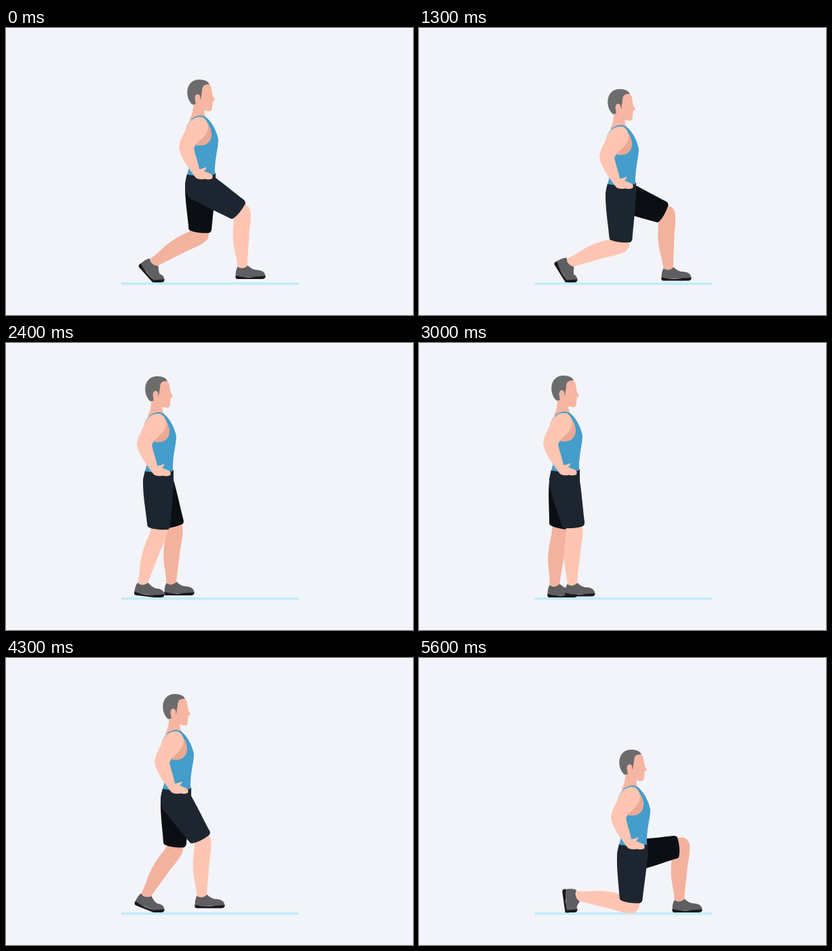
These frames come from a looping animation (600x423 px, 5.7 s). An HTML page:

```html
<!DOCTYPE html>
<html lang="en">
<head>
<meta charset="utf-8">
<title>Lunges</title>
<style>
  html, body { margin: 0; width: 100%; height: 100%; overflow: hidden; background: #f2f4f9; }
  svg { display: block; width: 100%; height: 100%; }
  .near { --skin: #ffc5b2; --shorts: #1d2630; }
  .far { --skin: #f2b29e; --shorts: #0b0f14; }
  .skin { fill: var(--skin); }
  .shorts { fill: var(--shorts); }
  .shoe { fill: #5f5e60; }
  .sole { fill: #18191d; }
  .shirt { fill: #449dcb; }
  .hair { fill: #6c6c6d; }
  .face { fill: #f6b6a2; }
  .shade { fill: #e9a995; }
</style>
</head>
<body>
<svg viewBox="0 0 600 423">
  <defs>
    <!-- bones run along +x, +y is the back of the leg -->
    <path id="shin" d="M-3 -12 C8 -14 20 -11 32 -10 C52 -9 64 -7 82 -7 L82 7.5 C66 8 54 14 34 14 C20 14 12 12 2 12 A12 12 0 0 1 -3 -12Z"/>
    <path id="thigh" d="M0 -22 C25 -21 48 -18 65 -17 Q70 -16 70 -12 Q71 4 67 14 Q66 17 62 17 C42 19 22 23 0 23 A22.5 22.5 0 0 1 0 -22Z"/>
    <!-- shoe halves share the ball of the foot as origin -->
    <g id="heel">
      <path class="shoe" d="M-29 -3 C-29 -11 -28 -15 -26 -18 Q-18 -13 -11 -20 Q-6 -15 0 -13.5 L1 -3Z"/>
      <path class="sole" d="M-29 -5 Q-15 -1 1 -3.5 L0 0 H-26 Q-30 0 -29 -5Z"/>
    </g>
    <g id="toe">
      <path class="shoe" d="M-1 -13.5 Q15 -14 15 -3 L-1 -2Z"/>
      <path class="sole" d="M-1 -3.5 L15 -4.5 Q15 0 10 0 H-1Z"/>
    </g>
    <g id="leg">
      <use href="#shin" class="skin"/>
      <use href="#heel"/>
      <use href="#toe"/>
      <use href="#thigh" class="shorts"/>
    </g>
  </defs>

  <rect width="600" height="423" fill="#f2f4f9"/>
  <rect width="600" height="1" fill="#fff"/>
  <rect x="170" y="375" width="262" height="3.5" rx="1" fill="#c1ebf8"/>

  <g id="far" class="far"></g>
  <g id="near" class="near"></g>

  <g id="body" class="near">
    <path class="shorts" d="M180 187 L222 186 V206 A22.5 22.5 0 0 1 177 206 Q177 196 180 187Z"/>
    <path class="face" d="M202 57 C208 52 216 55 216 62 L217.5 71 L221 78 L217.5 80.5 L217 89 Q217 95 211 94.500 L205.500 93 Q205 101 210 106 L190 118 L184 106 Q190 95 189 82Z"/>
    <path class="hair" d="M188 85 C176 75 177 48 198 48 C206 48 212 51 213 55.500 C205 54 202 58 202 65 L200 77 L194 77 Q191 80 193 84Z"/>
    <ellipse class="face" cx="195.500" cy="75.500" rx="4" ry="6"/>
    <path class="shirt" d="M178 122 C181 109 189 101 201 101 C212 102 223 121 226 136 C226 150 220 166 221 188 Q200 192 180 188 Q186 170 184 145Z"/>
    <path class="shade" d="M198 105 C209 106 216 119 216 129 C216 140 208 147 194 145Z"/>
    <path class="skin" d="M203 103.500 C211 108 213 118 209 126 C205 134 194 140 190 149 C192 160 196 169 198 180 Q203 180 208 177 Q209 179 205 183 L215 187 Q219 189 217 194 Q213 196 206 194.500 Q197 196 193 193 C184 181 171 165 168 149 C168 138 176 128 180 116 C184 107 194 101 203 103.500Z"/>
  </g>
</svg>
<script>
const LOOP = 5700, STEP = 100;
const THIGH = 73, SHIN = 81;
const HIP = { x: 200, y: 204 };
const BALL = { x: 218.5, y: 375 };
const STRIDE = 184;
const DEG = Math.PI / 180;

// ms, body shift x, body shift y, forward step, heel raise in degrees
const LUNGE = [
  [-100, 0, 0, 0, 0],
  [0, 15, 0, 26, 0],
  [100, 47, 4, 82, 19],
  [200, 79, 19, 134, 40],
  [300, 98, 42, 168, 58],
  [400, 112, 75, 183, 73],
  [500, 114, 83, 184, 78],
  [700, 115, 87, 184, 82],
  [900, 114, 83, 184, 78],
  [1000, 113, 78, 184, 75],
  [1100, 97, 40, 165, 57],
  [1150, 87, 28, 149, 48],
  [1300, 51, 5, 89, 22],
  [1400, 25, 1, 44, 7],
  [1500, 7, 0, 12, 0],
  [1600, 0, 0, 0, 0]
];

const body = document.getElementById('body');
const legs = {};
for (const side of ['near', 'far']) {
  const group = document.getElementById(side);
  group.append(...document.getElementById('leg').cloneNode(true).children);
  const [shin, heel, toe, thigh] = group.children;
  legs[side] = { shin, heel, toe, thigh };
}

function poseAt(ms) {
  const last = LUNGE[LUNGE.length - 1];
  if (ms <= LUNGE[0][0]) return LUNGE[0].slice(1);
  if (ms >= last[0]) return last.slice(1);
  const i = LUNGE.findIndex(key => key[0] > ms);
  const a = LUNGE[i - 1], b = LUNGE[i];
  const k = (ms - a[0]) / (b[0] - a[0]);
  return a.slice(1).map((v, j) => v + (b[j + 1] - v) * k);
}

function schedule(t) {
  if (t < 900) return { front: 'near', ms: 1150 + (t < 200 ? 0 : (t - 100) * 0.85) };
  if (t < 3000) return { front: 'far', ms: t - 1000 };
  if (t < 4900) return { front: 'near', ms: t - 3000 };
  return { front: 'far', ms: t - 4900 };
}

function place(el, x, y, angle = 0, scale = 1) {
  el.setAttribute('transform', `translate(${x} ${y}) rotate(${angle}) scale(${scale})`);
}

const heading = (a, b) => Math.atan2(b.y - a.y, b.x - a.x) / DEG;

// two-bone chain whose knee always bends forward
function kneeOf(hip, ankle) {
  const dx = ankle.x - hip.x, dy = ankle.y - hip.y, d = Math.hypot(dx, dy);
  const along = Math.min(THIGH, (d * d + THIGH * THIGH - SHIN * SHIN) / (2 * d));
  const out = Math.sqrt(THIGH * THIGH - along * along);
  return { x: hip.x + (dx * along + dy * out) / d, y: hip.y + (dy * along - dx * out) / d };
}

function drawLeg(leg, hip, ball, raise) {
  const sin = Math.sin(raise * DEG), cos = Math.cos(raise * DEG);
  const size = 1 + 0.17 * sin, heelX = ball.x - 3 * sin;
  const ankle = {
    x: heelX + size * (-18.5 * cos + 17 * sin),
    y: ball.y + size * (-18.5 * sin - 17 * cos)
  };
  const knee = kneeOf(hip, ankle);
  place(leg.thigh, hip.x, hip.y, heading(hip, knee));
  place(leg.shin, knee.x, knee.y, heading(knee, ankle));
  place(leg.heel, heelX, ball.y, raise, size);
  place(leg.toe, ball.x, ball.y);
}

function render(t) {
  const { front, ms } = schedule(t);
  const [dx, dy, step, raise] = poseAt(ms);
  const hip = { x: HIP.x + dx, y: HIP.y + dy };
  const lift = 7 * Math.sin(Math.PI * (step / STRIDE) ** 1.4);
  const back = front === 'near' ? 'far' : 'near';
  drawLeg(legs[front], hip, { x: BALL.x + step, y: BALL.y - lift }, 0);
  drawLeg(legs[back], hip, BALL, raise);
  place(body, dx, dy);
}

const start = performance.now();
function tick() {
  const t = (performance.now() - start) % LOOP;
  render(Math.floor(t / STEP) * STEP);
  requestAnimationFrame(tick);
}
tick();
</script>
</body>
</html>
```
